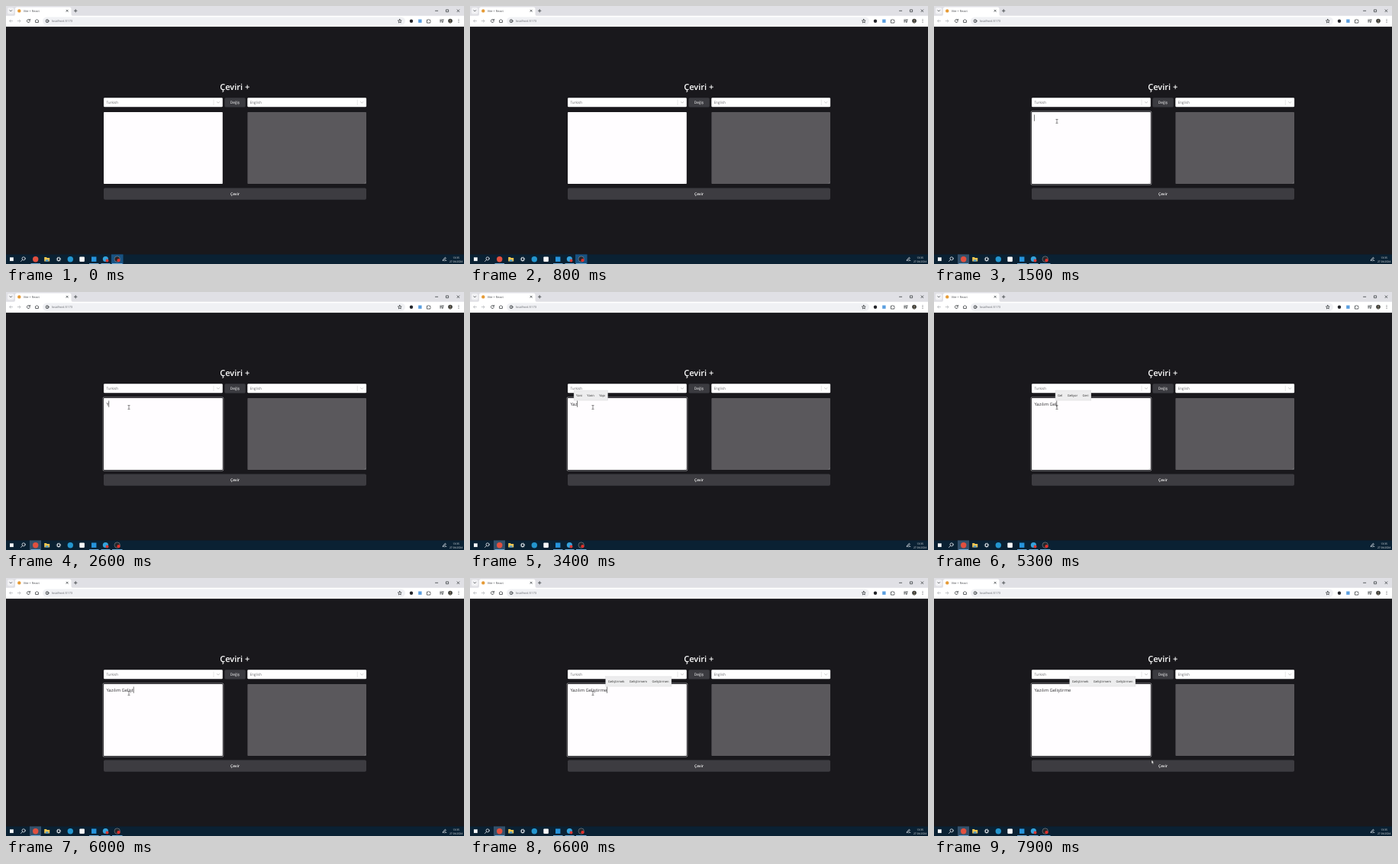
Animation of 600 by 338 pixels, one loop 8 s. Source, as an HTML page:

```html
<!DOCTYPE html>
<html lang="tr">
<head>
<meta charset="utf-8">
<title>Çeviri +</title>
<style>
html, body { margin: 0; width: 100%; height: 100%; overflow: hidden; background: #19181c; }
svg { display: block; width: 600px; height: 338px; }
text {
  font-family: "Open Sans", "Noto Sans", sans-serif;
  text-rendering: geometricPrecision;
  white-space: pre;
}
.line { fill: none; stroke: #3c4043; stroke-width: .8; stroke-linecap: round; stroke-linejoin: round; }
.soft { stroke: #b4b6ba; }
.pale { stroke: #e8edf1; }
.mid { text-anchor: middle; }
.label { font-size: 4.6px; fill: #626266; }
.tray { font-size: 3.4px; fill: #f2f5f7; }
.pop text { font-size: 4.1px; fill: #2c2c2c; }

/* one loop is 8 s; hard switches use step-end */
.focused, .blurred, .cursor, .arrow, .beam { animation: 8s infinite step-end; }
.focused { animation-name: on; }
.blurred { animation-name: off; }
.cursor { animation-name: move; }
.arrow { animation-name: arrow; }
.beam { animation-name: beam; }
@keyframes on { 0% { opacity: 0; } 18.75%, 100% { opacity: 1; } }
@keyframes off { 0% { opacity: 1; } 18.75%, 100% { opacity: 0; } }
@keyframes move {
  0% { transform: translate(-12px, 190px); }
  12% { transform: translate(-12px, 190px); animation-timing-function: ease-out; }
  18% { transform: translate(161px, 151px); }
  90% { transform: translate(161px, 151px); animation-timing-function: ease-in-out; }
  98.7%, 100% { transform: translate(285px, 238.5px); }
}
@keyframes arrow { 0% { opacity: 1; } 15% { opacity: 0; } 97%, 100% { opacity: 1; } }
@keyframes beam { 0% { opacity: 0; } 15% { opacity: 1; } 97%, 100% { opacity: 0; } }
</style>
</head>
<body>
<svg viewBox="0 0 600 338">
  <rect width="600" height="338" fill="#19181c"/>

  <!-- browser tabs -->
  <rect width="600" height="14" fill="#e0e0e5"/>
  <rect x="2" y="2" width="8.5" height="8.5" rx="2.2" fill="#f1f1f4"/>
  <path class="line" d="M5 5.7l1.3 1.3 1.3-1.3"/>
  <path d="M10 13q2 0 2-2V4q0-2.5 2.5-2.5h68.500q2.500 0 2.500 2.500v7q0 2 2 2z" fill="#fff"/>
  <circle cx="17.300" cy="6.400" r="2.200" fill="#e59a35"/>
  <text x="22.700" y="8" font-size="3.900" fill="#47494d">Vite + React</text>
  <path class="line" d="M79 5.200l2.200 2.200m0-2.200l-2.200 2.200M89.400 6.300h3.600M91.200 4.500v3.600"/>
  <path class="line" stroke-width=".5" d="M562.500 6.300h3.200M576.800 4.900h2.800v2.800h-2.800zM591 4.900l2.800 2.800m0-2.800l-2.800 2.800"/>

  <!-- toolbar -->
  <rect y="12.800" width="600" height="14.300" fill="#fff"/>
  <rect x="48" y="14.500" width="475" height="10.300" rx="5.150" fill="#f0f1f4"/>
  <path class="line soft" d="M8.500 19.600H4.700m1.600-1.600L4.700 19.600l1.600 1.600M15.200 19.600H19m-1.600-1.600l1.600 1.600-1.600 1.600"/>
  <path class="line" d="M31.200 18.600a2 2 0 1 0 .1 1.700M31.500 17.300v1.500H30M38.600 19.300v2.200h3.800v-2.200M38.300 19.400l2.200-1.900 2.200 1.900"/>
  <circle class="line" cx="54" cy="19.700" r="2"/>
  <path class="line" stroke-width=".6" d="M54 19.500v1M54 18.500v.1"/>
  <text x="60" y="21.200" font-size="4" fill="#63666b">localhost:5173</text>
  <path class="line" stroke-width=".6" d="M515.800 17.300l.7 1.600 1.700.2-1.300 1.200.4 1.700-1.500-.9-1.500.9.400-1.700-1.300-1.200 1.700-.2z"/>
  <circle cx="531" cy="19.700" r="2.200" fill="#232429"/>
  <rect x="540.200" y="17.500" width="4.400" height="4.400" fill="#5b9fe0"/>
  <path class="line" d="M551.800 18.200h1.300q.6-1.400 1.300 0h1.300v1.400q1.400.6 0 1.300v1.200h-3.900z"/>
  <path class="line" d="M568.700 18h3M568.700 19.500h2M568.700 21h1.200M572.300 20.900v-3h1"/>
  <circle cx="571.700" cy="21" r=".8" fill="#3c4043"/>
  <circle cx="582" cy="19.600" r="2.800" fill="#373a36"/>
  <circle cx="582" cy="18.800" r="1" fill="#8b7768"/>
  <path d="M580.100 21.600q1.900-2.700 3.800 0q-1.900 1.300-3.800 0" fill="#6d6a5c"/>
  <g fill="#3c4043"><circle cx="593" cy="17.800" r=".5"/><circle cx="593" cy="19.600" r=".5"/><circle cx="593" cy="21.400" r=".5"/></g>

  <!-- translator -->
  <text class="mid" x="299.700" y="109.800" font-size="11" font-weight="600" fill="#fff">Çeviri +</text>
  <g id="from">
    <rect x="128" y="120.300" width="155.800" height="12" rx="1.200" fill="#fff"/>
    <path d="M272 122.700v7.300" stroke="#ccc" stroke-width=".5"/>
    <path class="line" style="stroke:#bcbcbc" d="M276.300 125.600l1.700 1.500 1.700-1.500"/>
  </g>
  <use href="#from" x="188.300"/>
  <text class="label" x="131.400" y="128">Turkish</text>
  <text class="label" x="319.500" y="128">English</text>
  <rect x="286.500" y="120.300" width="27.200" height="12.200" rx="1.500" fill="#3b3b40"/>
  <text class="mid" x="300" y="128.300" font-size="4.800" fill="#fff">Değiş</text>

  <g class="focused">
    <rect x="126.600" y="137.600" width="158.600" height="96.800" rx="1.600" fill="#929195"/>
    <rect x="127.300" y="138.300" width="157.200" height="95.400" rx="1.200" fill="#161518"/>
  </g>
  <rect x="128" y="139" width="155.800" height="94" rx=".8" fill="#fffdff"/>
  <rect x="316.400" y="139" width="155.600" height="94" rx=".8" fill="#5a585c"/>
  <path d="M281.500 232.400l1.800-1.800M469.800 232.400l1.800-1.800" stroke="#9a9a9c" stroke-width=".4"/>
  <rect x="128" y="238.500" width="344" height="15.300" rx="1.800" fill="#3d3c41"/>
  <text class="mid" x="300" y="248" font-size="4.900" font-weight="600" fill="#fff">Çevir</text>

  <text id="typed" x="131.400" y="149.300" font-size="5.800" fill="#2d2d2f"></text>
  <rect id="caret" y="142.400" width=".6" height="8.400" fill="#222"/>
  <g id="pops"></g>

  <!-- taskbar -->
  <rect y="325.400" width="600" height="12.600" fill="#0a2133"/>
  <rect class="focused" x="31" y="325.400" width="15" height="12.600" fill="#34506a"/>
  <rect class="blurred" x="138" y="325.400" width="15.500" height="12.600" fill="#185282"/>
  <path d="M32.500 337.500h12.500M109 337.500h12.500M124.500 337.500h12M139 337.500h13.500" stroke="#7ab8e6" stroke-width=".9"/>
  <rect x="5" y="329.300" width="4.800" height="4.800" fill="#f4f8fb"/>
  <circle class="line pale" cx="23.100" cy="330.900" r="2.100"/>
  <path class="line pale" d="M21.500 332.500l-2 2"/>
  <circle cx="38.700" cy="331.700" r="3.700" fill="#e2503f"/>
  <path d="M50.200 329h2.700l.8.900h3.500v4.700h-7z" fill="#f3c64f"/>
  <path d="M51.800 332.300h3.800v2.300h-3.800z" fill="#4e9ccc"/>
  <circle class="line pale" cx="69" cy="331.700" r="1.900" style="stroke-width:1.100"/>
  <circle class="line pale" cx="69" cy="331.700" r="2.800" style="stroke-dasharray:.8 1.400;stroke-linecap:butt"/>
  <circle cx="84.300" cy="331.700" r="3.700" fill="#2496cf"/>
  <rect x="96.300" y="328.500" width="6.600" height="6.600" rx="1" fill="#f6f7f8"/>
  <rect x="112" y="328.500" width="6.400" height="6.400" fill="#2694dc"/>
  <circle cx="130.400" cy="331.500" r="3.600" fill="#35a3dd"/>
  <circle cx="132.500" cy="333.600" r="2" fill="#d93a35"/>
  <circle cx="145.700" cy="331.600" r="3.700" fill="#24252a" stroke="#a4a8ad" stroke-width=".5"/>
  <circle cx="147.500" cy="333.200" r="2.100" fill="#e0312c"/>
  <path class="line pale" d="M572.300 333.400l.5-1.500 2.600-2.500 1 1-2.600 2.500zM574.700 333.800q1.200-1.300 2.200-.5"/>
  <text class="mid tray" x="589.600" y="330.500">13:35</text>
  <text class="mid tray" x="589.600" y="336.200">27.04.2024</text>

  <g class="cursor">
    <path class="arrow" d="M0 0v4.700l1.100-1 .8 1.700.8-.4-.8-1.600h1.500z" fill="#fff" stroke="#111" stroke-width=".35"/>
    <path class="beam line" style="stroke:#333;stroke-width:.6" d="M-1.100-2.500h.8l.3.300.3-.3h.8M0-2.200v4.500M-1.100 2.600h.8l.3-.3.3.3h.8"/>
  </g>
</svg>
<script>
const LOOP = 8000, CLICK = 1500, LEFT = 131.4;
const phrase = "Yazılım Geliştirme";
// moment each letter is typed
const keys = [2600, 3100, 3400, 3600, 3800, 4000, 4100, 4300, 4900,
  5100, 5200, 5500, 5800, 6000, 6200, 6300, 6400, 6400];
// suggestions: from, to, letters before the box, top, words
const hints = [
  [2800, 3300, 1, 129, "Yok Yarın Yapma"],
  [3300, 3600, 2, 129, "Yani Yarın Yapı"],
  [3600, 3800, 3, 129, "Yazık Yazın Yazdım"],
  [3800, 4100, 4, 127.5, "Yazı Yazılım Yazıyor"],
  [4500, 4900, 8, 129, "ve için yazılım"],
  [5000, 5200, 9, 129, "Güzel Gelen Geliyorum"],
  [5300, 5500, 11, 129, "Gel Geliyor Geri"],
  [5600, 6000, 12, 129, "Geliyor Gelin Geldi"],
  [6200, 6600, 14, 129, "Geliştirmeye Geliştirmek Geliştirilmiş"],
  [6600, 8000, 18, 129, "Geliştirmek Geliştirmem Geliştirmen"]
];

const byId = id => document.getElementById(id);
const typed = byId("typed"), caret = byId("caret");

function add(parent, tag, attrs) {
  const el = document.createElementNS("http://www.w3.org/2000/svg", tag);
  for (const k in attrs) el.setAttribute(k, attrs[k]);
  return parent.appendChild(el);
}

typed.textContent = phrase;
const ends = [LEFT];
for (let n = 1; n <= phrase.length; n++) ends.push(LEFT + typed.getSubStringLength(0, n));

const pops = hints.map(([from, to, n, top, words]) => {
  const g = add(byId("pops"), "g", { class: "pop" });
  const left = ends[n] - 1.5;
  const box = add(g, "rect", { x: left, y: top, height: 13, fill: "#ededee", stroke: "#cfcfd1", "stroke-width": .4 });
  let x = left + 3;
  for (const word of words.split(" ")) {
    const t = add(g, "text", { x, y: top + 8.2 });
    t.textContent = word;
    x += t.getComputedTextLength() + 6.3;
  }
  box.setAttribute("width", x - left - 3);
  return { g, from, to };
});

function draw(t) {
  const n = keys.filter(k => k <= t).length;
  const last = n ? keys[n - 1] : CLICK;
  typed.textContent = phrase.slice(0, n);
  caret.setAttribute("x", ends[n]);
  caret.style.opacity = t >= CLICK && (t - last) % 1000 < 500 ? 1 : 0;
  for (const p of pops) p.g.style.display = t >= p.from && t < p.to ? "" : "none";
}

let start;
function tick(now) {
  start ??= now;
  draw((now - start) % LOOP);
  requestAnimationFrame(tick);
}
draw(0);
requestAnimationFrame(tick);
</script>
</body>
</html>
```
